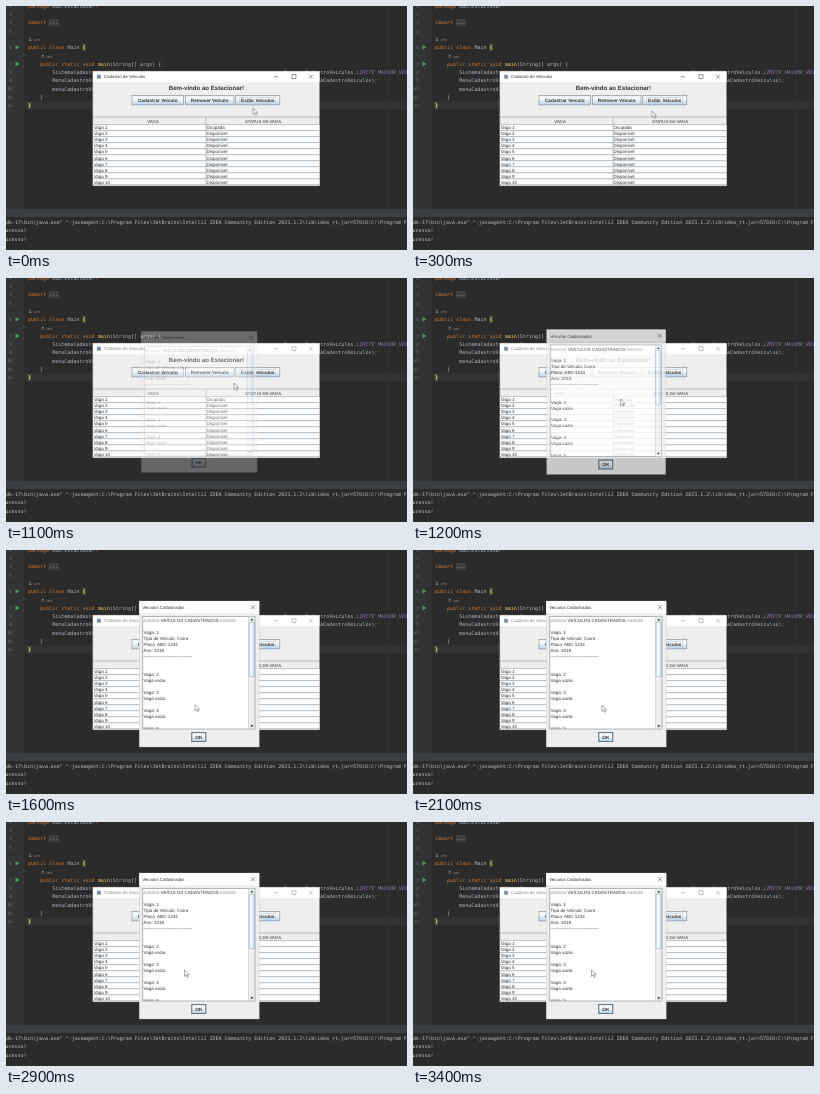
An HTML page that plays this animation: 401 by 244 pixels, repeating every 3500 ms.

```html
<!DOCTYPE html>
<html lang="pt">
<head>
<meta charset="utf-8">
<title>Cadastro de Veículos</title>
<style>
html, body { margin: 0; width: 100%; height: 100%; overflow: hidden; background: #2b2b2b; }
svg { display: block; width: 100%; height: 100%; }
text { font: 4.5px "Liberation Sans", Arial, sans-serif; fill: #333; white-space: pre; text-rendering: geometricPrecision; }
.code { font: 5.04px "DejaVu Sans Mono", monospace; fill: #a9b7c6; }
.log { font-size: 4.98px; fill: #bbb; }
.num { font-size: 4.4px; fill: #70757a; text-anchor: end; }
.hint { font-size: 3.8px; fill: #868a8d; }
.kw { fill: #cc7832; }
.fn { fill: #ffc66d; }
.brace { fill: #ffef28; font-weight: bold; }
.const { fill: #9876aa; font-style: italic; }
.mid { text-anchor: middle; }
.end { text-anchor: end; }
.bold { font-weight: bold; font-size: 4.7px; }
.big { font-size: 6.1px; }
.title { font-size: 4.35px; }
.head { font-size: 4.3px; }
</style>
</head>
<body>
<svg id="stage" viewBox="0 0 401 244" preserveAspectRatio="none"></svg>
<script>
const LOOP = 3500, STEP = 100;
const EDGE = '#7a8a99', PANEL = '#eeeeee';

const rect = (x, y, w, h, fill, more = '') =>
  `<rect x="${x}" y="${y}" width="${w}" height="${h}" fill="${fill}" ${more}/>`;
const path = (d, stroke, width = .5, fill = 'none') =>
  `<path d="${d}" stroke="${stroke}" stroke-width="${width}" fill="${fill}"/>`;
const text = (x, y, s, cls = '') => `<text x="${x}" y="${y}" class="${cls}">${s}</text>`;
const span = (cls, s) => `<tspan class="${cls}">${s}</tspan>`;
const border = (color, width = .6) => `stroke="${color}" stroke-width="${width}"`;
const cross = (x, y) => path(`M${x - 2} ${y - 2}l4 4m0-4l-4 4`, '#333');

function button(x, y, w, h, label, focused) {
  return rect(x, y, w, h, 'url(#metal)', border(EDGE)) +
    (focused ? rect(x + 4, y + 2, w - 8, h - 4, 'none', border('#a3b8cc', .4)) : '') +
    text(x + w / 2, y + h / 2 + 1.7, label, 'bold mid');
}

function editor() {
  const line = n => 43.1 + 8.3 * n;
  const code = (x, y, s, cls = '') => text(x, y, s, 'code ' + cls);
  const run = y => path(`M9.5 ${y - 2.4}l4 2.4l-4 2.4z`, 'none', 0, '#499c54');
  const brace = (x, y, s) => rect(x - .2, y - 5, 3.4, 6.6, '#3b514d') + code(x, y, s, 'brace');
  const hint = (x, y) => `<circle cx="${x + 1.7}" cy="${y - 2.2}" r=".9" fill="#868a8d"/>` +
    path(`M${x + .2} ${y}q1.5-2 3 0z`, 'none', 0, '#868a8d') + text(x + 5, y, 'Leo', 'hint');
  const numbers = [[1.8, 1], [10.1, 2], [18.4, 3], [26.7, 5], [line(0), 6],
    ...[7, 8, 9, 10, 11, 12].map(n => [line(n - 5), n])];

  return rect(0, 0, 401, 244, '#2b2b2b') +
    rect(0, 0, 18, 203, '#313335') +
    rect(0, 95, 401, 8.3, '#323232') +
    path('M18 0V203M382.5 0V203', '#3a3c3e', .4) +
    numbers.map(([y, n]) => text(6, y - .2, n, 'code num')).join('') +
    run(41.3) + run(57.9) +
    code(22, 1.8, span('kw', 'package') + ' Dbo.Estacionar' + span('kw', ';')) +
    rect(42.5, 13, 10.5, 7, '#3b3d3f') +
    code(22, 18.4, span('kw', 'import') + ' ...') +
    hint(22.5, 35) +
    code(22, line(0), span('kw', 'public class') + ' Main') + brace(76.6, line(0), '{') +
    hint(35, 51.5) +
    code(34.1, line(2), span('kw', 'public static void ') + span('fn', 'main') + '(String[] args) {') +
    code(46.2, line(3), 'SistemaCadastroVeiculos') +
    code(350.5, line(3), 'SistemaCadastroVeiculos.', 'end') +
    code(350.5, line(3), 'LIMITE_MAXIMO_VEICULOS', 'const') +
    code(46.2, line(4), 'MenuCadastroVeiculos') +
    code(371.5, line(4), 'sistemaCadastroVeiculos)' + span('kw', ';'), 'end') +
    code(46.2, line(5), 'menuCadastroVeiculos') +
    code(34.1, line(6), '}') + brace(22, line(7), '}') +
    rect(0, 203, 401, 8, '#3c3f41') +
    code(0, 217.8, 'dk-17\\bin\\java.exe" "-javaagent:C:\\Program Files\\JetBrains\\IntelliJ IDEA ' +
      'Community Edition 2023.1.2\\lib\\idea_rt.jar=57010:C:\\Program Files', 'log') +
    code(-.5, 226.3, 'ucesso!', 'log') + code(-.5, 234.6, 'ucesso!', 'log');
}

function mainWindow() {
  const rows = Array.from({ length: 10 }, (_, i) => {
    const y = 123.4 + 6.02 * i;
    return text(87.7, y, 'Vaga ' + (i + 1)) +
      text(200.6, y, i ? 'Disponível' : 'Ocupada') +
      path(`M87 ${y + 1.2}H313.5`, EDGE, .6);
  }).join('');

  return rect(86.8, 65.2, 226.9, 114.6, PANEL, border('#777')) +
    rect(87, 65.4, 226.5, 10.8, '#fff') +
    '<circle cx="93" cy="70.8" r="2.2" fill="#7d93aa"/>' +
    `<g id="caption">${text(98, 72.3, 'Cadastro de Veículos', 'title')}` +
    path('M268 70.7h4', '#333') + path('M286 68.6h4v4h-4z', '#333') + cross(305, 70.6) + '</g>' +
    text(200.4, 84.4, 'Bem-vindo ao Estacionar!', 'bold big mid') +
    button(126, 89.3, 51.5, 9.6, 'Cadastrar Veículo') +
    button(179.3, 89.3, 48.7, 9.6, 'Remover Veículo') +
    button(229.8, 89.3, 44, 9.6, 'Exibir Veículos', true) +
    path('M87 111H313.5', EDGE) +
    text(147, 116.8, 'VAGA', 'head mid') + text(257, 116.8, 'STATUS DA VAGA', 'head mid') +
    rect(87, 118.6, 226.5, 61, '#fff') +
    path('M87 118.6H313.5M200 111V179.6', EDGE) + rows;
}

function dialog() {
  const lines = [[72.3, '====== VEÍCULOS CADASTRADOS ======'],
    [84, 'Vaga: 1'], [89.9, 'Tipo de Veículo: Carro'], [95.8, 'Placa: ABC-1234'],
    [101.7, 'Ano: 2018'], [107.6, '-'.repeat(32)]];
  for (let n = 2; n <= 5; n++) {
    const y = 125.6 + 18 * (n - 2);
    lines.push([y, 'Vaga: ' + n], [y + 6, 'Vaga vazia']);
  }
  return rect(133.2, 51, 120, 146, PANEL, border('#bbb', .3)) +
    rect(133.3, 51.1, 119.8, 12.1, '#fff') +
    text(136.2, 59, 'Veículos Cadastrados', 'title') + cross(247, 57.3) +
    rect(136.8, 66.5, 112.2, 112.5, '#fff', border(EDGE)) +
    `<g clip-path="url(#area)">${lines.map(([y, s]) => text(137.6, y, s)).join('')}</g>` +
    rect(242.7, 66.8, 6, 112, PANEL, border('#b5bfca', .5)) +
    rect(243, 72.3, 5.5, 54, 'url(#thumb)', border('#8fa5cc', .5)) +
    path('M244.2 70.6l1.6-2l1.6 2zM244.2 175.2l1.6 2l1.6-2z', 'none', 0, '#333') +
    button(185.8, 182.5, 14, 9, 'OK') +
    rect(185.8, 182.5, 14, 9, 'none', border('#5d6f82', .9));
}

const gradient = (id, dir, stops) => `<linearGradient id="${id}" ${dir}>` +
  stops.map(([at, c]) => `<stop offset="${at}" stop-color="${c}"/>`).join('') + '</linearGradient>';

document.getElementById('stage').innerHTML = '<defs>' +
  gradient('metal', 'x2="0" y2="1"', [[0, '#dde8f3'], [.3, '#fff'], [1, '#b8cfe5']]) +
  gradient('thumb', '', [[0, '#dde8f3'], [.4, '#fff'], [1, '#b8cfe5']]) +
  `<clipPath id="area">${rect(137, 66.8, 105.5, 112, '#fff')}</clipPath></defs>` +
  editor() + mainWindow() + `<g id="dialog">${dialog()}</g>` +
  `<g id="cursor">${path('M0 0V6.4L1.5 5L2.6 7.4L3.6 6.9L2.6 4.6H4.6Z', '#666', .55, '#fff')}</g>`;

const [caption, popup, cursor] = ['caption', 'dialog', 'cursor'].map(id => document.getElementById(id));

// Keys are [ms, ...values], blended linearly.
const trail = [[0, 247, 102], [300, 239, 105], [600, 230, 109], [700, 230, 109], [850, 239, 98],
  [1000, 241, 96], [1100, 228, 105], [1200, 207.5, 121], [1300, 198, 137], [1450, 191, 150],
  [1600, 189, 154.5], [2500, 189, 155.5], [2700, 181, 151], [2900, 178.5, 148]];
const reveal = [[1000, 0, .94], [1100, .3, .965], [1200, .8, .992], [1300, 1, 1]];

function at(keys, t) {
  const i = keys.findIndex(k => k[0] > t);
  if (i < 0) return keys[keys.length - 1].slice(1);
  if (i === 0) return keys[0].slice(1);
  const a = keys[i - 1], b = keys[i], p = (t - a[0]) / (b[0] - a[0]);
  return a.slice(1).map((v, j) => v + (b[j + 1] - v) * p);
}

function draw(now) {
  const t = Math.floor(now % LOOP / STEP) * STEP;
  const [x, y] = at(trail, t), [alpha, scale] = at(reveal, t);
  cursor.setAttribute('transform', `translate(${x} ${y})`);
  popup.setAttribute('opacity', alpha);
  popup.setAttribute('transform', `translate(193 124) scale(${scale}) translate(-193 -124)`);
  caption.setAttribute('opacity', t < 1100 ? 1 : .6);
}

const start = performance.now();
(function tick() {
  draw(performance.now() - start);
  requestAnimationFrame(tick);
})();
</script>
</body>
</html>
```
